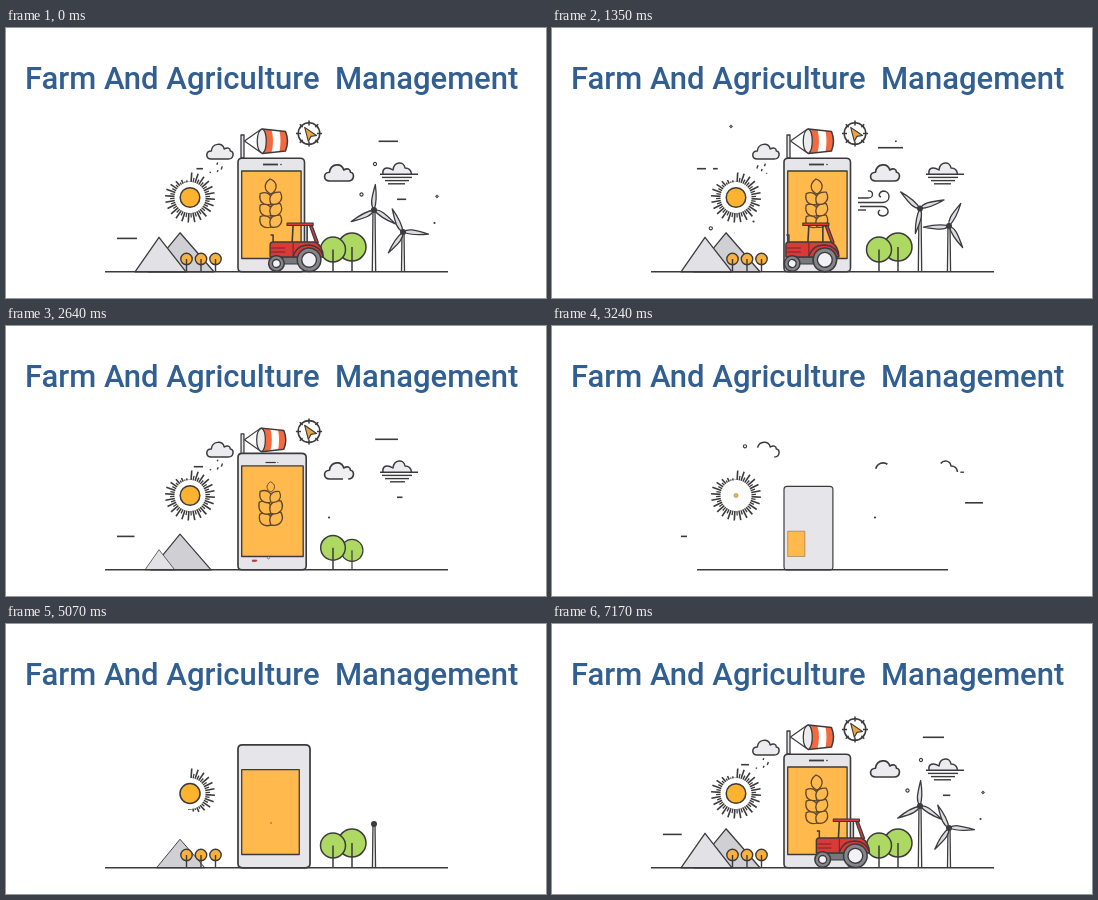
Write an HTML page with a canvas that moves like this. It is 540x270 px and loops after 7200 ms.

```html
<!DOCTYPE html>
<html lang="en">
<head>
<meta charset="utf-8">
<title>Farm And Agriculture Management</title>
<style>
html, body { margin: 0; width: 100%; height: 100%; overflow: hidden; background: #fff; }
canvas { position: absolute; left: 0; top: 0; width: 540px; height: 270px; }
h1 {
  position: absolute; left: 19px; top: 32.5px; margin: 0; white-space: pre;
  font: 500 31px/36px Roboto, "Open Sans", sans-serif; color: #315f92;
}
</style>
</head>
<body>
<canvas></canvas>
<h1>Farm And Agriculture  Management</h1>
<script>
const LOOP = 7200, BLANK = 4080, GROUND = 243.8;
const INK = '#3b3b3d', PALE = '#e6e6ea', ORANGE = '#ffb94c', RED = '#d93a38', SOCK = '#f5693f';

const canvas = document.querySelector('canvas');
const ctx = canvas.getContext('2d');
const dpr = window.devicePixelRatio || 1;
canvas.width = 540 * dpr;
canvas.height = 270 * dpr;

// Timing helpers: u runs from one blank stage to the next.
const clamp = v => Math.max(0, Math.min(1, v));
const ramp = (u, from, to) => clamp((u - from) / (to - from));
const smooth = p => p * p * (3 - 2 * p);
const phase = (u, start, end, dur) =>
  u < end ? ramp(u, start, start + dur) : 1 - ramp(u, end, end + dur);
const pop = (u, start, end, dur = 450) => {
  const p = phase(u, start, end, dur), x = p - 1;
  return p === 0 ? 0 : Math.max(0, 1 + 2.55 * x ** 3 + 1.55 * x * x);
};
const rise = (u, start, end, dur) => 1 - (1 - phase(u, start, end, dur)) ** 3;

// Drawing helpers
const paths = {}, lengths = {};
const path = d => paths[d] || (paths[d] = new Path2D(d));

function pathLength(d) {
  if (!lengths[d]) {
    const el = document.createElementNS('http://www.w3.org/2000/svg', 'path');
    el.setAttribute('d', d);
    lengths[d] = el.getTotalLength();
  }
  return lengths[d];
}

function shape(d, fill, width = 1.5, color = INK) {
  if (fill) { ctx.fillStyle = fill; ctx.fill(path(d)); }
  if (width) { ctx.lineWidth = width; ctx.strokeStyle = color; ctx.stroke(path(d)); }
}

function disc(x, y, r, fill, width = 1.5) {
  ctx.beginPath();
  ctx.arc(x, y, r, 0, Math.PI * 2);
  if (fill) { ctx.fillStyle = fill; ctx.fill(); }
  if (width) { ctx.lineWidth = width; ctx.strokeStyle = INK; ctx.stroke(); }
}

function line(x1, y1, x2, y2, width = 1.5) {
  ctx.beginPath();
  ctx.moveTo(x1, y1);
  ctx.lineTo(x2, y2);
  ctx.lineWidth = width;
  ctx.strokeStyle = INK;
  ctx.stroke();
}

function trim(d, from, to, width = 1.5) {
  if (to <= from) return;
  const len = pathLength(d);
  ctx.save();
  ctx.setLineDash([len * (to - from), len * 2]);
  ctx.lineDashOffset = -len * from;
  shape(d, null, width);
  ctx.restore();
}

// Draws in a local frame whose origin is the pivot.
function at(x, y, scale, degrees, draw) {
  if (scale <= 0) return;
  ctx.save();
  ctx.translate(x, y);
  ctx.rotate(degrees * Math.PI / 180);
  ctx.scale(scale, scale);
  draw();
  ctx.restore();
}

function aboveGround(draw) {
  ctx.save();
  ctx.beginPath();
  ctx.rect(0, 0, 540, GROUND);
  ctx.clip();
  draw();
  ctx.restore();
}

// x1, x2, y, start, duration of each half
const DASHES = [
  [343, 392, 113.3, 5820, 860], [326, 368, 119.7, 5430, 705],
  [161, 197, 140.7, 5745, 800], [139, 154, 140.7, 5250, 430],
  [182, 205, 204.5, 5846, 450], [208, 215, 204.5, 6300, 270],
  [111, 135, 210.4, 6710, 590], [391, 405, 171.3, 7050, 230],
  [413, 431, 176.8, 7400, 340]
];
const PERIOD = 2700;

// x, y, kind, start, end
const SPECKS = [
  [369, 136, 'ring', 6700, 7700], [355.5, 166.5, 'ring', 5950, 7600],
  [431, 168.5, 'diamond', 6850, 7550], [428.5, 195, 'dot', 6900, 7600],
  [179, 98.5, 'diamond', 8250, 9600], [201.5, 193.5, 'dot', 8200, 8850],
  [158.8, 200.3, 'ring', 8300, 9600], [167, 130.5, 'diamond', 8900, 9600],
  [323, 191.5, 'dot', 8950, 10450], [216, 146, 'dot', 5900, 6400],
  [193, 120.3, 'ring', 10000, 10850]
];

function dashes(u) {
  for (const [x1, x2, y, start, dur] of DASHES) {
    for (const s of [start, start + PERIOD]) {
      const head = ramp(u, s, s + dur), tail = ramp(u, s + dur, s + 2 * dur);
      if (head > tail) line(x1 + (x2 - x1) * tail, y, x1 + (x2 - x1) * head, y, 1.6);
    }
  }
}

function specks(u) {
  for (const [x, y, kind, start, end] of SPECKS) {
    at(x, y, pop(u, start, end, 160), 0, () => {
      if (kind === 'ring') disc(0, 0, 1.6, '#fff', 1.1);
      else if (kind === 'dot') disc(0, 0, 1.1, INK, 0);
      else shape('M0-1.6L1.6 0L0 1.6L-1.6 0Z', '#777', .8);
    });
  }
}

function ground(u) {
  let half = 171.5 * ramp(u, 4190, 4935);
  if (u > 10180) half = 171.5 - 46 * ramp(u, 10180, 10440) - 100 * ramp(u, 10440, 10950)
    - 25.5 * ramp(u, 10950, 11160);
  if (half > 0) line(270.5 - half, GROUND, 270.5 + half, GROUND, 1.6);
}

function mountains(u) {
  at(174, GROUND, pop(u, 4960, 9500, 500), 0, () =>
    shape('M-32 0L0-39L34 0Z', '#cfcfd4', 1.3));
  at(153, GROUND, pop(u, 5150, 9420, 500), 0, () =>
    shape('M-24 0L0-34.500L27 0Z', '#e1e1e6', 1.3));
}

function orchard(u) {
  aboveGround(() => [180.5, 195, 209.5].forEach((x, i) => {
    const y = 231 + 26 * (1 - rise(u, 4450 + i * 70, [9250, 9060, 9010][i], 400));
    disc(x, y, 5.7, '#fbb13c', 1.4);
    line(x, y, x, y + 13, 1.4);
  }));
}

function greenTrees(u) {
  [[346, 24.8, 14], [327, 22.3, 12.5]].forEach(([x, h, r], i) =>
    at(x, GROUND, pop(u, 4480 + i * 80, 9500 + i * 60), 0, () => {
      disc(0, -h, r, '#add862');
      line(0, -h, 0, 0);
    }));
}

function turbine(x, y, angle, blade) {
  shape(`M${x - 1} ${y}L${x - 2.8} 340H${x + 2.8}L${x + 1} ${y}Z`, '#f4f4f6', 1.3);
  for (let i = 0; i < 3; i++) {
    at(x, y, blade(i), angle + i * 120, () =>
      shape('M0 0C-4-5-3.5-10 0-25.5C2-15 2-6 0 0Z', '#dcdce1', 1.3));
  }
  disc(x, y, 3, INK, 0);
}

function turbines(u) {
  const t = u - LOOP;
  aboveGround(() => {
    const lift = smooth(ramp(u, 7200, 8500));
    turbine(397, 204 - 6 * lift + 75 * (1 - rise(u, 5450, 8796, 650)), -25 + t * .039,
      i => pop(u, [5800, 6150, 5880][i], 20000, 320));
    turbine(368, 182 - 1.5 * lift + 90 * (1 - rise(u, 4800, 8700, 650)), 3 + t * .05,
      i => pop(u, 5250 + i * 90, 20000, 350));
  });
}

function sun(u) {
  const from = ramp(u, 10480, 11100), to = ramp(u, 4790, 5330);
  at(184, 169.5, 1, 4, () => {
    const count = 48;
    for (let i = 0; i < count; i++) {
      const f = i / count, a = f * Math.PI * 2 - Math.PI / 2;
      if (f < from || f >= to) continue;
      const c = Math.cos(a), s = Math.sin(a);
      const out = 15.5 + (i % 2 ? 4.5 : 9.5) * clamp((to - f) * 5);
      line(c * 15.5, s * 15.5, c * out, s * out, i % 2 ? 1.3 : 1.6);
    }
  });
  at(184, 169.5, pop(u, 4550, 9870, 600), 0, () => disc(0, 0, 9.8, '#fdb32f'));
}

function phone(u) {
  at(232, GROUND, pop(u, 4470, 9700, 950), 0, () =>
    shape('M4-113.500H62Q66.500-113.500 66.500-109.500V-4Q66.500 0 62.500 0H4Q0 0 0-4V-109.500Q0-113.500 4-113.500Z', PALE, 1.6));
  at(235.7, 230.5, pop(u, 4780, 9696, 800), 0, () =>
    shape('M0 0V-87.500H59.400V0Z', ORANGE, 1.3));
  at(265, 136.5, pop(u, 5250, 9600, 300), 0, () => {
    line(-8, 0, 7, 0, 1.8);
    disc(10, 0, .8, INK, 0);
  });
}

function wheat(u) {
  const stem = phase(u, 5050, 9450, 800);
  if (stem > 0) line(265, 199.5, 265, 199.5 - 38 * stem, 1.2);
  const leaf = 'M0 0C-7-3-8-10-1-15C7-12 7-4 0 0Z';
  for (let i = 0; i < 7; i++) {
    const row = Math.floor(i / 2), side = i % 2 ? 1 : -1;
    at(265, i === 6 ? 166 : 199 - row * 11.5, pop(u, 5560 + i * 120, 9600 + (6 - i) * 30, 300),
      i === 6 ? 0 : side * 42, () => shape(leaf, ORANGE, 1.3, '#5c4630'));
  }
}

function windsock(u) {
  at(236.5, 130, pop(u, 5350, 9550), 0, () => {
    const body = 'M20-29L43-26.500Q47-17 43-7L20-4.500Z';
    shape('M-1.5 0V-23H1.500V0Z', PALE, 1.3);
    shape('M2-17L19-29V-5Z', '#fff', 1.2);
    shape(body, '#fff', 0);
    shape('M20-29L29-28Q32-17 29-5.500L20-4.500Z', SOCK, 0);
    shape('M37-27L43-26.500Q47-17 43-7L37-6.300Q39-17 37-27Z', SOCK, 0);
    shape(body);
    shape('M20-29C13-27 13-7 20-4.500C25-8 25-26 20-29Z', '#ececef', 1.3);
  });
}

function compass(u) {
  at(303, 105.5, pop(u, 5450, 9600, 400), 0, () => {
    disc(0, 0, 10.8, '#fff', 1.5);
    for (let i = 0; i < 8; i++) {
      const a = i * Math.PI / 4, r = i % 2 ? 9 : 8;
      line(Math.cos(a) * r, Math.sin(a) * r, Math.cos(a) * 13, Math.sin(a) * 13, 1.5);
    }
    at(0, 0, 1, -35 * smooth(ramp(u, 6100, 6700)), () =>
      shape('M0-7.500L5 6L0 3.500L-5 6Z', '#e9a540', 1.1));
  });
}

const CLOUD = 'M22 0H5C-1 0-1-8 5-8C6-16 16-17 18-10C21-12 24-11 24-8C28-8 28 0 22 0';
const FOG = 'M377 146C376 140 381 138 387 142C388 133 398 133 399 140C403 140 405 142 405.500 146';

// The outline leaves from its start up to the crown, then from its end.
function outline(u, d, start, end) {
  ctx.globalAlpha = ramp(u, start + 250, start + 550) * (1 - ramp(u, end, end + 300));
  shape(d, '#ececef', 0);
  ctx.globalAlpha = 1;
  const from = .45 * ramp(u, end, end + 400);
  const to = 1 - .55 * ramp(u, end + 400, end + 800);
  trim(d, from, Math.min(to, ramp(u, start, start + 500)));
}

function clouds(u) {
  at(200.3, 131, 1, 0, () => outline(u, CLOUD, 5700, 10040));
  at(318, 153, 1.1, 0, () => outline(u, CLOUD, 5550, 9780));
  outline(u, FOG, 6250, 10040);
  [[374, 412], [376, 406], [379, 403], [382, 399]].forEach(([x1, x2], i) => {
    const y = 146.2 + i * 3.2, w = x2 - x1, end = 10060 - i * 90;
    const head = ramp(u, 6350 + i * 70, 6750 + i * 70), tail = ramp(u, end, end + 420);
    if (head > tail) line(x1 + w * tail, y, x1 + w * head, y, 1.4);
  });
}

function rain(u) {
  if (u < 6450 || u > 9900) return;
  [207, 212, 217.5, 214].forEach((x, i) => {
    const p = ((u - 6450) / 900 + i * .29) % 1, len = .8 + 4 * Math.sin(p * Math.PI) * (1 - p);
    const y = 133 + p * 13;
    line(x - p * 3, y, x - p * 3 - len * .35, y + len, 1.4);
  });
}

const GUSTS = [
  'M306 170H316C322 170 322 162 316 163',
  'M306 174.500H331C339 174 339 163 331 163C327 164 326 168 329 169',
  'M308 178.500H329C337 178 339 187 331 188C326 188 325 184 328 182',
  'M306 182H314'
];

function wind(u) {
  for (const s of [5400, 5400 + PERIOD]) {
    GUSTS.forEach((d, i) =>
      trim(d, ramp(u, s + 500 + i * 20, s + 1150), ramp(u, s, s + 400), 1.4));
  }
}

function wheel(x, y, r, hub, scale, turn) {
  at(x, y, scale, turn, () => {
    disc(0, 0, r, '#85858b', 1.5);
    disc(0, 0, hub, '#f2f2f4', 1.4);
  });
}

function tractor(u) {
  const x = 4.5 * (1 - ramp(u, 6100, 6700)) - 41.5 * smooth(ramp(u, 7000, 9300));
  ctx.save();
  ctx.translate(x, 0);

  // The rear post swings up before the rest of the cab arrives.
  const post = phase(u, 5930, 9300, 350);
  if (post > 0) at(312, 215, 1, -80 + 60 * post, () =>
    shape('M-1.3 0V-18H1.3V0Z', RED, 1.2));
  at(308, 215, pop(u, 6180, 9330, 400), 0, () => {
    shape('M-21 0L-20-18M-6 0V-18', null, 1.6);
    shape('M-26-20H0V-17.500H-26Z', RED, 1.2);
  });
  at(268, 215, pop(u, 6250, 9330, 300), 0, () => shape('M0 0V-8H-2.500', null, 1.5));
  at(290, 236, pop(u, 5780, 9400), 0, () => {
    shape('M-20-7H14V0H-20Z', '#77777d', 1.2);
    shape('M-25-7V-19Q-25-22-22-22H20Q28-18 28-7Z', RED, 1.4);
    shape('M-24-16H-10M-24-12H-10M-2-21V-8', null, 1.1, '#7d2328');
    shape('M-2-7Q1-19 14-19Q25-18 28-8', null, 1.3);
  });
  wheel(304, 231.8, 11.8, 7.4, pop(u, 5700, 9450, 400), x * 5);
  wheel(271.3, 235.5, 7.8, 4, pop(u, 5750, 9420, 400), x * 8);
  ctx.restore();
}

const LAYERS = [dashes, specks, wind, clouds, rain, sun, mountains, orchard, windsock,
  compass, turbines, phone, wheat, greenTrees, tractor, ground];

let origin;
function frame(now) {
  if (origin === undefined) origin = now;
  const t = (now - origin) % LOOP;
  const u = t < BLANK ? t + LOOP : t;
  ctx.setTransform(dpr, 0, 0, dpr, 0, 0);
  ctx.clearRect(0, 0, 540, 270);
  ctx.lineJoin = 'round';
  for (const layer of LAYERS) layer(u);
  requestAnimationFrame(frame);
}
requestAnimationFrame(frame);
</script>
</body>
</html>
```
